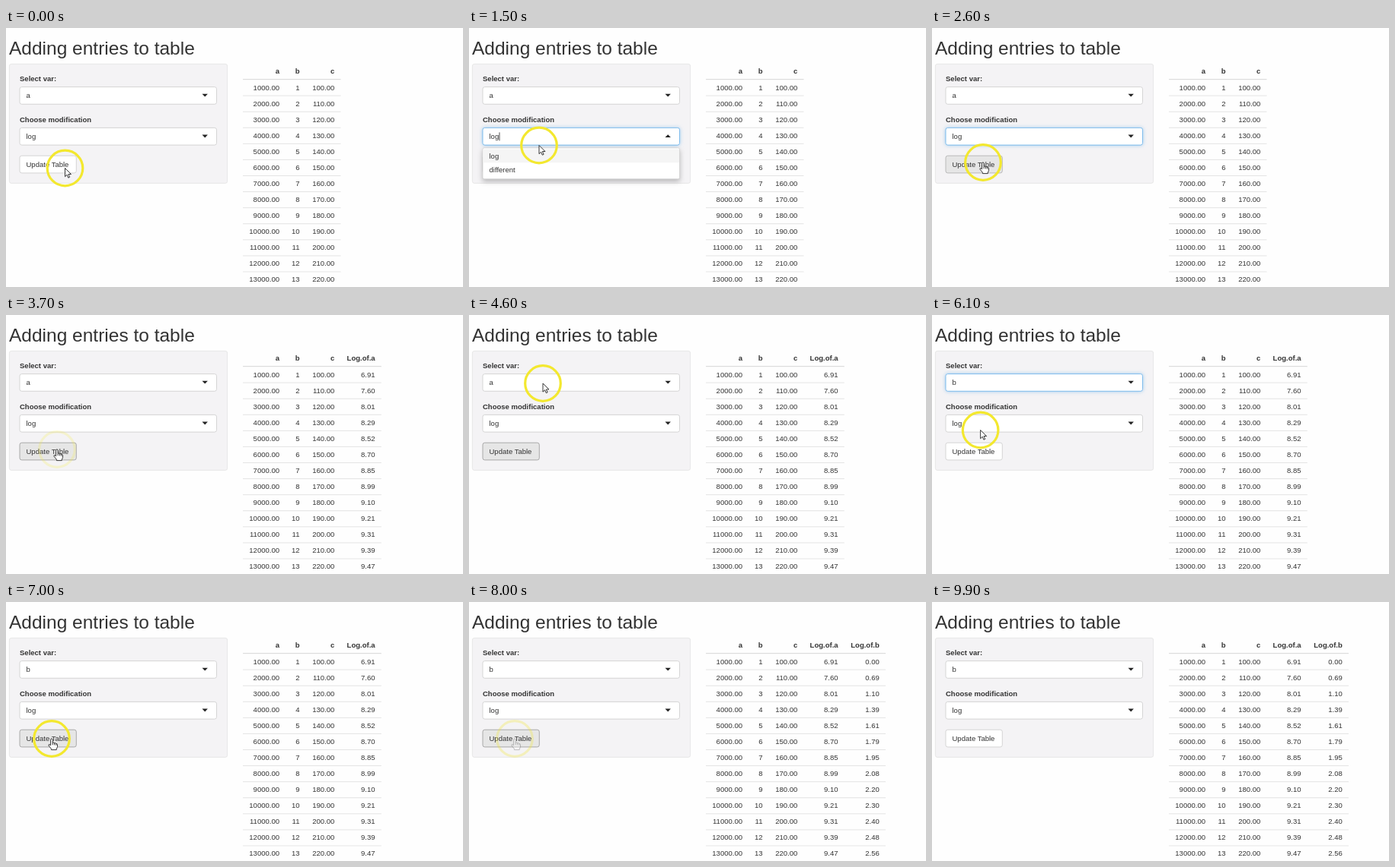
An HTML page for the animation above (10000 ms loop, 600 by 341 pixels).

```html
<!DOCTYPE html>
<html lang="en">
<head>
<meta charset="utf-8">
<title>Adding entries to table</title>
<style>
html, body { margin: 0; width: 100%; height: 100%; overflow: hidden; background: #fefefe; }
svg { display: block; width: 600px; height: 341px; }
text { font: 9.53px "Liberation Sans", Arial, sans-serif; fill: #333; }
.bold { font-weight: bold; }
.end { text-anchor: end; }
.title { font-size: 24.5px; }
.glow { filter: drop-shadow(0 0 2.5px rgba(102, 175, 233, .6)); }
.menu { filter: drop-shadow(0 3px 3px rgba(0, 0, 0, .25)); }
</style>
</head>
<body>
<svg id="stage" viewBox="0 0 600 341"></svg>
<script>
const stage = document.getElementById('stage');
const LOOP = 10000, STEP = 100;

// Pointer path: time, x, y
const path = [
  [0, 77.5, 184.5], [200, 77.5, 184.5], [900, 100, 143], [1100, 100, 143],
  [1500, 92, 154.5], [1800, 74, 168], [2000, 74, 168], [2400, 67, 177],
  [4100, 67, 177], [4600, 97, 90], [4800, 97, 90], [5200, 81.5, 121.5],
  [5600, 66, 133], [5800, 66, 133], [6500, 60, 180], [LOOP, 60, 180]
];

// Table columns: heading, right edge, value for row n, time shown
const columns = [
  ['a', 359, n => (n * 1000).toFixed(2), 0],
  ['b', 385.5, n => n, 0],
  ['c', 431.3, n => (90 + n * 10).toFixed(2), 0],
  ['Log.of.a', 484.6, n => Math.log(n * 1000).toFixed(2), 3000],
  ['Log.of.b', 538.8, n => Math.log(n).toFixed(2), 7200]
];

const within = (t, from, to) => t >= from && t < to;
const ramp = (t, from, to) => Math.min(1, Math.max(0, (t - from) / (to - from)));

function pointerAt(t) {
  const i = path.findIndex(p => p[0] > t);
  const [t0, x0, y0] = path[i - 1], [t1, x1, y1] = path[i];
  const u = ramp(t, t0, t1), k = u * u * (3 - 2 * u);
  return [x0 + (x1 - x0) * k, y0 + (y1 - y0) * k];
}

const text = (x, y, s, cls = '') => `<text x="${x}" y="${y}" class="${cls}">${s}</text>`;
const box = (x, y, w, h, fill, stroke = 'none', r = 2.7, cls = '') =>
  `<rect x="${x}" y="${y}" width="${w}" height="${h}" rx="${r}" fill="${fill}" stroke="${stroke}" stroke-width=".8" class="${cls}"/>`;
const rule = (y, right, w) =>
  `<path d="M311 ${y}H${right}" stroke="#ddd" stroke-width="${w}"/>`;

function select(y, value, focus, open) {
  const mid = y + 11.4;
  const arrow = open ? `M257.5 ${mid + 1.2}h7.4l-3.7-3.8z` : `M257.5 ${mid - 2.2}h7.4l-3.7 3.8z`;
  const caretX = 27.3 + 9.53 * (value.length > 1 ? 1.334 : 0.556);
  return box(18, y, 258.5, 22.7, '#fff', focus ? '#66afe9' : '#ccc', 2.7, focus ? 'glow' : '') +
    text(26.5, y + 14.6, value) +
    `<path d="${arrow}" fill="#222"/>` +
    (open ? `<path d="M${caretX} ${y + 6}v11" stroke="#222" stroke-width=".8"/>` : '');
}

function menu(y, items, active) {
  const rows = items.map((s, i) =>
    (i === active ? box(18.5, y + 1.8, 257.5, 17.7, '#f5f5f5', 'none', 0) : '') +
    text(26.5, y + 14 + i * 17.7, s));
  return box(18, y, 258.5, 5.6 + items.length * 17.7, '#fff', '#d0d0d0', 2, 'menu') + rows.join('');
}

function table(t) {
  const shown = columns.filter(c => t >= c[3]);
  const right = shown[shown.length - 1][1] + 8.2;
  let out = rule(67.6, right, 1.4);
  for (const [name, x] of shown) out += text(x, 60.2, name, 'bold end');
  for (let n = 1; n <= 13; n++) {
    const y = 81.5 + (n - 1) * 21.08;
    if (n < 13) out += rule(y + 7.6, right, .8);
    for (const [, x, value] of shown) out += text(x, y, value(n), 'end');
  }
  return out;
}

function button(t) {
  const hover = within(t, 2200, 4700) || within(t, 6300, 8200);
  const focus = within(t, 2700, 4700) || within(t, 6700, 8200);
  const edge = focus ? '#999' : hover ? '#adadad' : '#ccc';
  return box(18, 168.2, 74.3, 22.7, hover ? '#e6e6e6' : '#fff', edge) + text(26.5, 183, 'Update Table');
}

function pointer(t) {
  const [x, y] = pointerAt(t);
  const hand = within(t, 1600, 4400) || within(t, 4900, 5900) || t >= 6300;
  const shape = hand
    ? 'M-1.4 8.8V1.3a1.3 1.3 0 0 1 2.6 0V5.2q2.2-.6 2.4.6q2-.4 2.2.7q1.7-.1 1.7 1.3V10.5q-.2 1.5-1.2 2.6V14.6H-.6V13.2L-3.9 9.2q-.6-1.6.8-1.7zM1.2 5.2v3M3.6 5.8v2.6M5.8 6.5v2.2'
    : 'M0 0V11.2L2.6 8.7 4.3 12.7 6.1 11.9 4.4 8H8z';
  const ring = t < 4200 ? 1 - .8 * ramp(t, 3300, 3700) : 1;
  const fade = 1 - ramp(t, 7500, 8200);
  return `<g transform="translate(${x} ${y})" opacity="${fade}">
    <circle r="23.3" fill="none" stroke="#f3e82f" stroke-width="3.2" opacity="${ring}"/>
    <path d="${shape}" fill="#fff" stroke="#222" stroke-width=".9" stroke-linejoin="round"/></g>`;
}

function draw(t) {
  const openVar = within(t, 4700, 5800), openMod = within(t, 1000, 2000);
  stage.innerHTML =
    text(4, 35, 'Adding entries to table', 'title') +
    box(4.4, 47.4, 286.2, 157, '#f4f3f5', '#e3e3e3') +
    text(18, 70, 'Select var:', 'bold') +
    select(77.6, t < 5800 ? 'a' : 'b', within(t, 4700, 6700), openVar) +
    text(18, 124.4, 'Choose modification', 'bold') +
    select(131.4, 'log', within(t, 1000, 2700), openMod) +
    button(t) +
    (openVar ? menu(103.6, ['a', 'b', 'c'], t < 5400 ? 0 : 1) : '') +
    (openMod ? menu(157.8, ['log', 'different'], 0) : '') +
    table(t) +
    pointer(t);
}

const start = performance.now();
let last = -1;
function tick() {
  const t = Math.floor((performance.now() - start) % LOOP / STEP) * STEP;
  if (t !== last) draw(last = t);
  requestAnimationFrame(tick);
}
tick();
</script>
</body>
</html>
```
